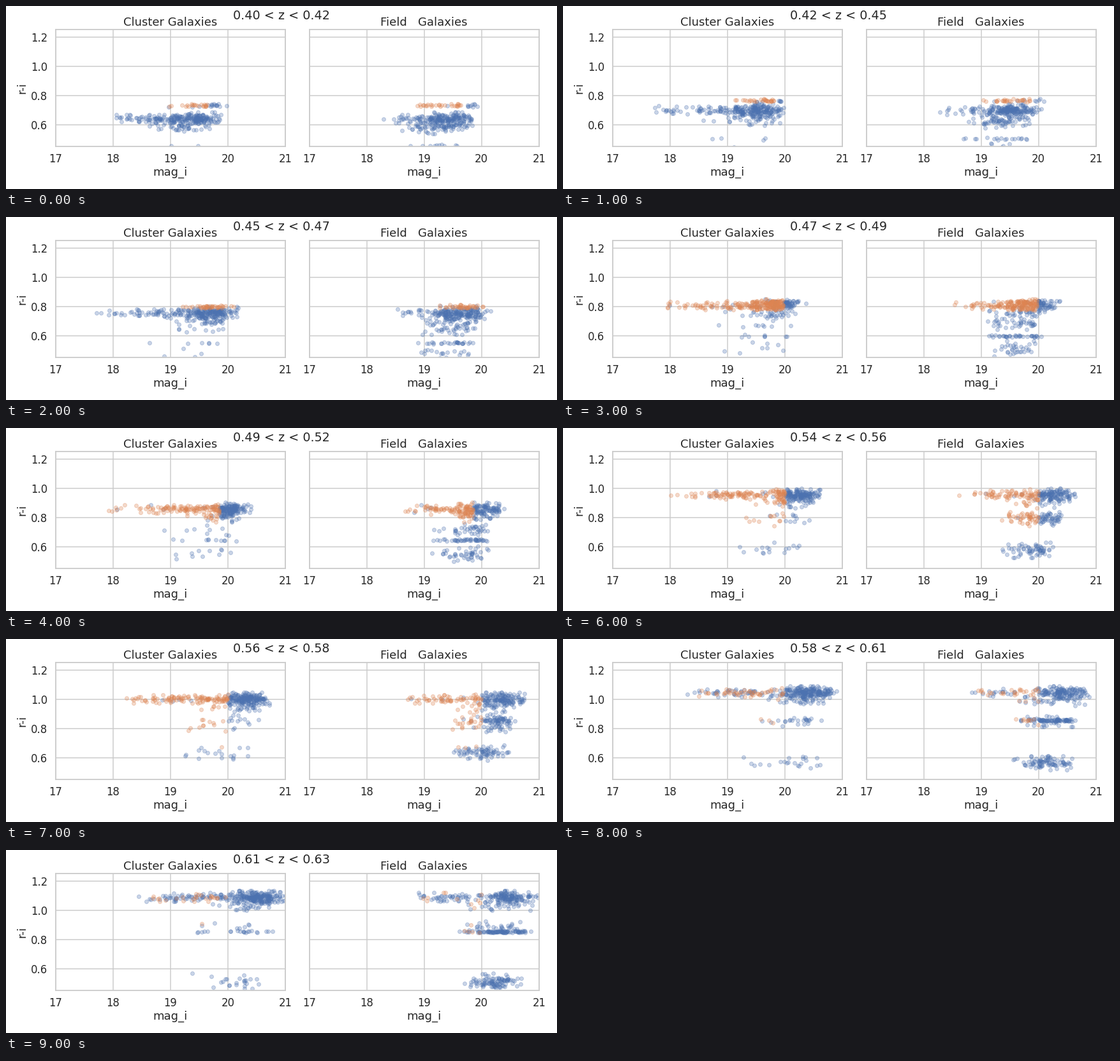
A matplotlib script for the animation above (10 s loop, 864 by 288 pixels).

```python
import numpy as np
import matplotlib.pyplot as plt
from matplotlib.animation import FuncAnimation

W, H, DPI = 864, 288, 72
STEPS = 10
BLUE, ORANGE = "#4C72B0", "#DD8452"
INK, GRID = "0.15", "0.8"

plt.rcParams.update({"font.family": "DejaVu Sans", "text.color": INK,
                     "axes.labelcolor": INK, "axes.axisbelow": True})


def band(rng, n, low, peak, high, colour, spread):
    """Galaxies around one colour, skewed in magnitude."""
    mag = rng.triangular(low, peak, high, int(n))
    return mag, colour + spread * np.clip(rng.normal(size=int(n)), -2, 2)


def galaxies(k, cluster):
    """Magnitudes, colours and red-selection mask for redshift bin k."""
    rng = np.random.default_rng(20 + k + STEPS * cluster)
    peak = 19.4 + .17 * k - .006 * k * k
    faint = 19.95 + .12 * k
    ridge = .64 + .058 * k - .0009 * k * k
    second = np.interp(k, [0, 2, 4, 6, 7, 9], [.457, .55, .645, .8, .86, .853])
    third = .58 + .034 * k
    lowest = np.interp(k, [0, 4, 6, 7, 8, 9], [.4, .55, .575, .635, .57, .515])
    bright = 17.4 + .1 * k if cluster else 18.2 + .06 * k
    side = peak - (1.2 if cluster else .9)
    few = .25 if cluster else 1

    parts = [
        band(rng, 110 if cluster else 70, bright, 19.4, peak + .3, ridge, .015),
        band(rng, 120 + 9 * k if cluster else 125, peak - .5, peak + .05,
             faint, ridge, .022),
        band(rng, 30, peak - .9, peak, faint - .1, ridge - .055, .018),
        band(rng, (10 + 8 * k) * few, side, peak - .05, faint - .15, second,
             .004 + .016 * (4 < k < 8)),
        band(rng, 38 * few, side, peak - .1, faint - .15, third, .02),
        band(rng, 11 * k * few, side, peak - .15, faint - .25, lowest, .026),
    ]
    if k < 4:
        parts.append(band(rng, 38, peak - .6, peak + .1, faint + .1,
                          .732 + .033 * k, .006))
    mag, colour = np.hstack(parts)

    limit = np.interp(k, [0, 2, 4, 6], [19.65, 20.1, 19.85, 20])
    cut = np.interp(k, [0, 2, 4, 6], [.722, .788, .76, .67])
    share = np.interp(k, [7, 8, 9], [.95, .45, .2])
    red = (mag < limit) & (colour > cut) & (rng.random(mag.size) < share)
    return mag, colour, red


def make_axes(left, title):
    ax = fig.add_axes([left / W, 66.8 / H, 360 / W, 184 / H])
    ax.set(xlim=(17, 21), ylim=(.45, 1.25), xticks=range(17, 22),
           yticks=[.6, .8, 1, 1.2])
    ax.set_title(title, fontsize=18, pad=6.3)
    ax.set_xlabel("mag_i", fontsize=18, labelpad=3.2)
    ax.grid(color=GRID, lw=1.5)
    ax.tick_params(length=0, pad=12.5, labelsize=16.5, labelcolor=INK)
    ax.tick_params(axis="x", pad=10.8)
    for spine in ax.spines.values():
        spine.set(color=GRID, linewidth=1.875)
    return ax


def markers(ax, color):
    return ax.plot([], [], "o", color=color, alpha=.3, ms=6, mew=1)[0]


fig = plt.figure(figsize=(W / DPI, H / DPI), dpi=DPI, facecolor="white")
left_ax = make_axes(78, "Cluster Galaxies")
left_ax.set_ylabel("r-i", fontsize=18, labelpad=4.6)
right_ax = make_axes(475.7, "Field   Galaxies")
right_ax.tick_params(labelleft=False)
heading = fig.suptitle("", fontsize=19.1)

panels = []
for ax, cluster in ((left_ax, True), (right_ax, False)):
    scenes = [galaxies(k, cluster) for k in range(STEPS)]
    panels.append((scenes, markers(ax, BLUE), markers(ax, ORANGE)))


def edge(k):
    return round(40 + 2.3 * k) / 100


def draw(k):
    heading.set_text(f"{edge(k):.2f} < z < {edge(k + 1):.2f}")
    for scenes, blue, orange in panels:
        mag, colour, red = scenes[k]
        blue.set_data(mag[~red], colour[~red])
        orange.set_data(mag[red], colour[red])


anim = FuncAnimation(fig, draw, frames=STEPS, init_func=lambda: draw(0),
                     interval=1000, repeat=True)
plt.show()
```
